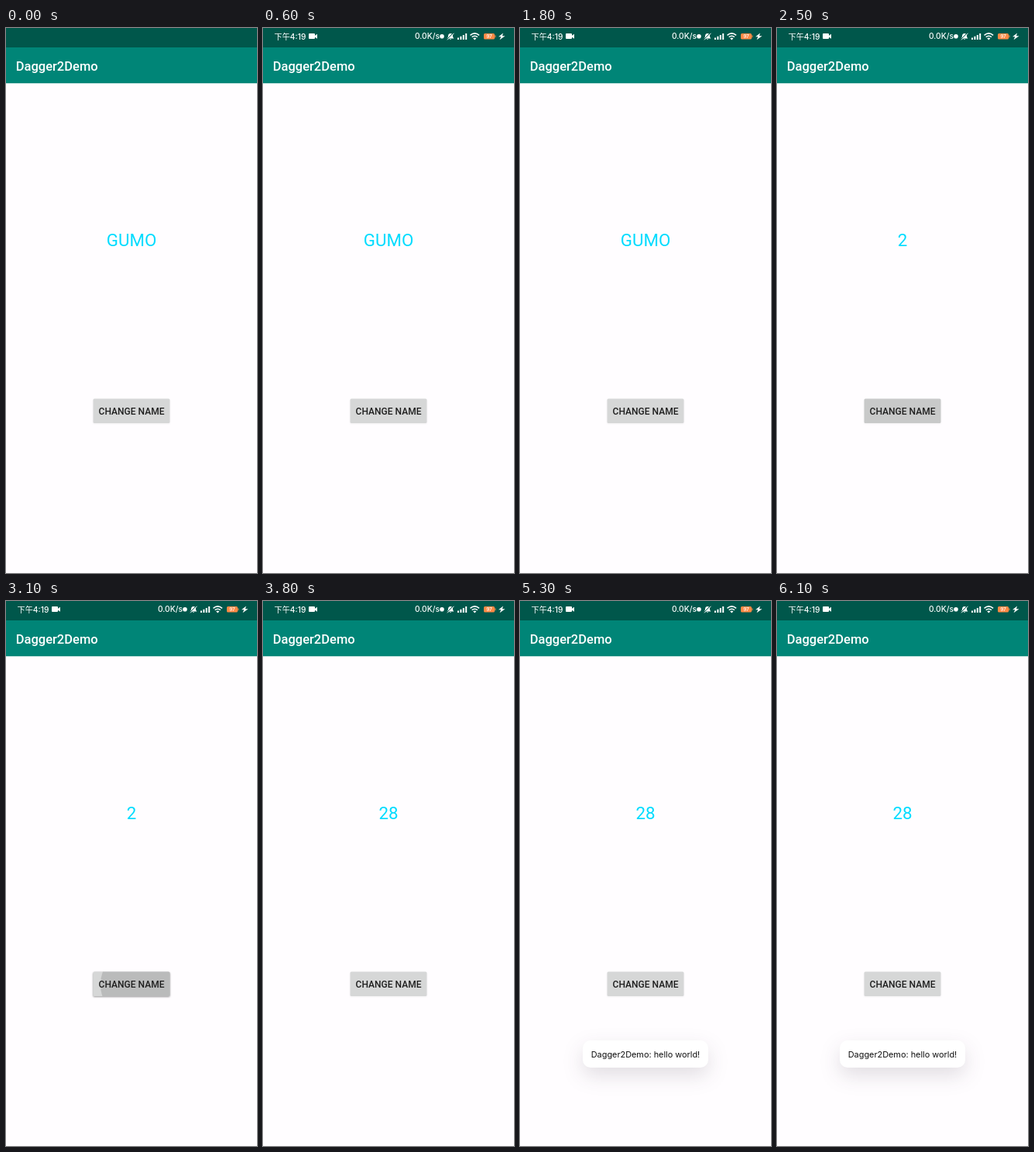
An HTML page for the animation above (6.2 s loop, 324 by 702 pixels).

```html
<!DOCTYPE html>
<html lang="en">
<head>
<meta charset="utf-8">
<style>
  html, body { margin: 0; height: 100%; overflow: hidden; background: #fffdff; }
  svg { display: block; width: 324px; height: 702px; font-family: Roboto, sans-serif; }
  #status text { font-family: Inter, "Noto Sans CJK SC", "Noto Sans CJK", sans-serif; font-weight: 500; }
  #button { filter: drop-shadow(0 1px 1px rgba(0, 0, 0, var(--lift))); }
  #toast rect { filter: drop-shadow(0 10px 13px rgba(40, 25, 50, .14)); }
  #toast text { font-family: Inter, sans-serif; }
</style>
</head>
<body>
<svg viewBox="0 0 324 702">
  <clipPath id="face"><rect x="112.5" y="477.5" width="99" height="31.5" rx="1.6"/></clipPath>

  <rect width="324" height="71.2" fill="#008577"/>
  <rect width="324" height="25" fill="#00574b"/>
  <text x="12.8" y="55" font-size="16.5" font-weight="500" fill="#fff">Dagger2Demo</text>

  <g id="status" fill="#fff">
    <text x="14.5" y="14.5" font-size="10.2">下午4:19</text>
    <path d="M60 7h6q1 0 1 1v1.8l3-2v6l-3-2v1.2q0 1-1 1h-6q-1 0-1-1v-5q0-1 1-1z"/>
    <text x="196" y="14.3" font-size="10.2">0.0K/s</text>
    <circle cx="231" cy="10.8" r="2.8"/>
    <path d="M237.500 13.500q1.500-1 1.500-3 0-3.500 3-3.500t3 3.500q0 2 1.500 3zM240.800 14.200h2.400l-1.200 1z"/>
    <path d="M237.500 14.500l8.500-8.500" stroke="#00574b"/>
    <path d="M238 15.300l8.500-8.500" stroke="#fff"/>
    <path d="M251 12.500h2v2.500h-2zM254.400 10.800h2v4.200h-2zM257.800 9h2v6h-2zM261.200 7h2v8h-2z"/>
    <path d="M267.500 9.300q5.800-4.800 11.600 0M269.700 11.600q3.600-2.800 7.200 0" fill="none" stroke="#fff" stroke-width="1.5"/>
    <path d="M271.200 13.200q2.100-1.400 4.200 0l-2.100 2.300z"/>
    <rect x="285" y="7" width="14" height="7.5" rx="1.5" fill="#ff8a45"/>
    <rect x="299.400" y="9.300" width="1" height="3" fill="#ff8a45"/>
    <text x="292" y="13.200" font-size="6.500" text-anchor="middle">97</text>
    <path d="M310 6.500l-6 4.700h3.300l-1.800 4 7-5h-3.600z"/>
  </g>

  <text id="name" x="162" y="280.800" font-size="22.300" fill="#00dcff" text-anchor="middle"></text>

  <g id="button">
    <rect x="112.500" y="477.500" width="99" height="31.500" rx="1.600" fill="#d6d7d7"/>
    <circle id="ripple" cx="172" cy="494" clip-path="url(#face)"/>
    <text x="162" y="497.600" font-size="12" font-weight="500" fill="#1f1f1f" text-anchor="middle">CHANGE NAME</text>
  </g>

  <g id="toast">
    <rect x="81" y="566" width="162" height="35" rx="10" fill="#fff"/>
    <text x="162" y="587.500" font-size="10.900" fill="#111" text-anchor="middle">Dagger2Demo: hello world!</text>
  </g>
</svg>
<script>
const LOOP = 6200, STEP = 100;
const presses = [2000, 3000, 4100];
const [status, nameText, button, ripple, toast] =
  ["status", "name", "button", "ripple", "toast"].map(id => document.getElementById(id));
const ramp = (t, from, to) => Math.min(1, Math.max(0, (t - from) / (to - from)));

function draw(now) {
  const t = Math.floor(now % LOOP / STEP) * STEP;
  status.style.opacity = ramp(t, 200, 600);
  nameText.textContent = t < 2200 ? "GUMO" : t < 3200 ? "2" : "28";

  const age = t - (presses.filter(p => p <= t).pop() ?? -LOOP);
  const fade = 1 - ramp(age, 300, 700);
  ripple.setAttribute("r", 10 + 80 * ramp(age, 0, 200));
  ripple.setAttribute("fill-opacity", .13 * fade);
  button.style.setProperty("--lift", .05 + .35 * ramp(age, 0, 100) * (1 - ramp(age, 200, 500)));

  toast.style.opacity = ramp(t, 4100, 4300);
  requestAnimationFrame(draw);
}
requestAnimationFrame(draw);
</script>
</body>
</html>
```
